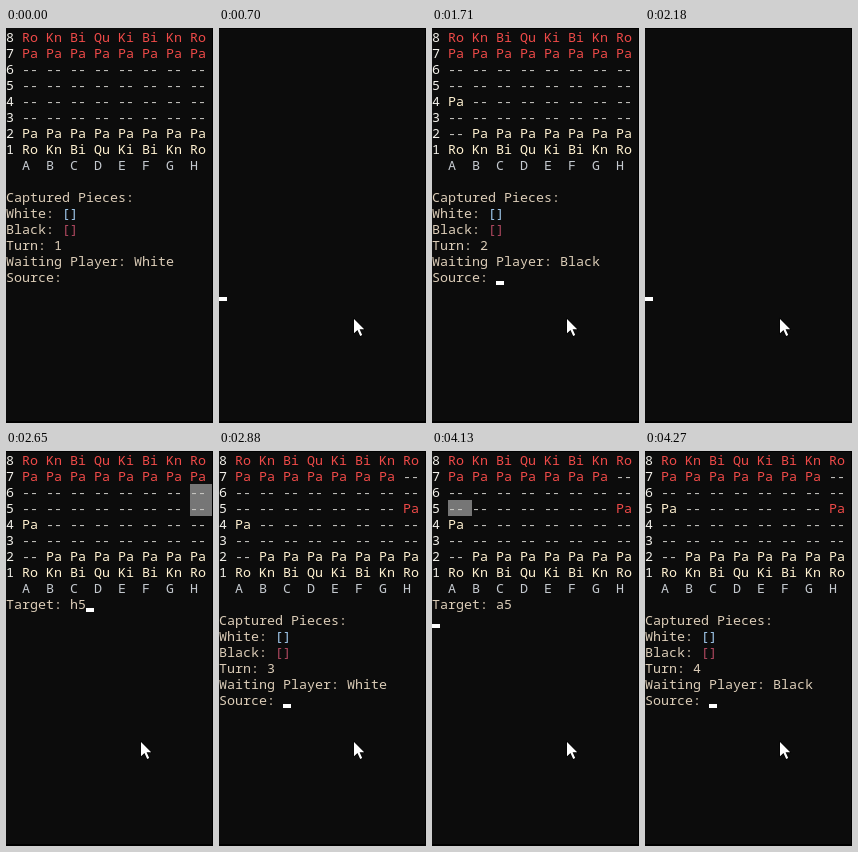
An HTML page that plays this animation: 207 by 395 pixels, repeating every 4350 ms.

```html
<!DOCTYPE html>
<html lang="en">
<head>
<meta charset="utf-8">
<title>Console chess</title>
<style>
html, body { margin: 0; width: 100%; height: 100%; overflow: hidden; background: #0c0c0c; }
svg { display: block; width: 207px; height: 395px; }
text { font: 13.333px "Noto Sans Mono", "DejaVu Sans Mono", monospace; white-space: pre; }
.edge { fill: #000; }
.caret { fill: #fff; }
.mark { fill: #767676; }
.red { fill: #ee4a48; }
.cream { fill: #fff1d0; }
.num { fill: #f2f0ea; }
.grey { fill: #cccac6; }
.file { fill: #c4c9cf; }
.label { fill: #dccdb8; }
.blue { fill: #a4cdf2; }
.wine { fill: #b54a62; }
</style>
</head>
<body>
<svg viewBox="0 0 207 395">
  <rect width="207" height="395" fill="#0c0c0c"/>
  <g id="screen"></g>
  <path class="edge" d="M206 0h1v395h-1zM0 393h207v2H0z"/>
  <g id="overlay">
    <path class="edge" d="M0 0h207v1H0z"/>
    <path d="M134.5 289.5v17l3.8-3.4 2.6 5.6 3-1.4-2.5-5.3h5z" fill="#000"/>
    <path d="M135 291v14.2l3.5-3.2 2.7 6 2-1-2.6-5.7h4.6z" fill="#fff"/>
  </g>
</svg>
<script>
const LOOP = 4350, CELL = 8, LINE = 16;
const screen = document.getElementById('screen');
const overlay = document.getElementById('overlay');

const rect = (col, row, cols, cls, top = 0) =>
  `<rect class="${cls}" x="${col * CELL}" y="${row * LINE + 1 + top}" width="${cols * CELL}" height="${LINE - top}"/>`;
const put = (col, row, str, cls) =>
  `<text class="${cls}" x="${col * CELL}" y="${row * LINE + 14}">${str}</text>`;
const caret = (col, row) => rect(col, row, 1, 'caret', 12);

// Squares are written like "a4"; the board lists rank 8 first.
const at = sq => [sq.charCodeAt(0) - 97, 8 - sq[1]];

function position(moves) {
  const back = 'Ro Kn Bi Qu Ki Bi Kn Ro'.split(' ');
  const side = (names, cls) => names.map(name => ({ name, cls }));
  const pawns = Array(8).fill('Pa'), none = Array(8).fill('--');
  const ranks = [side(back, 'red'), side(pawns, 'red')];
  for (let i = 0; i < 4; i++) ranks.push(side(none, 'grey'));
  ranks.push(side(pawns, 'cream'), side(back, 'cream'));
  for (const [from, to] of moves) {
    const [c, r] = at(from), [c2, r2] = at(to);
    ranks[r2][c2] = ranks[r][c];
    ranks[r][c] = { name: '--', cls: 'grey' };
  }
  return ranks;
}

const GAME = [['a2', 'a4'], ['h7', 'h5'], ['a4', 'a5']];

function board(turn, marks = []) {
  let out = '';
  for (const sq of marks) {
    const [c, r] = at(sq);
    out += rect(2 + 3 * c, r, 3, 'mark');
  }
  position(GAME.slice(0, turn - 1)).forEach((rank, r) => {
    out += put(0, r, 8 - r, 'num');
    rank.forEach((p, c) => out += put(2 + 3 * c, r, p.name, p.cls));
  });
  [...'ABCDEFGH'].forEach((f, c) => out += put(2 + 3 * c, 8, f, 'file'));
  return out;
}

// A null input hides the caret; "\n" puts it on the next line.
function prompt(row, label, input, typed = '') {
  let out = put(0, row, label, 'label');
  if (typed) out += put(8, row, typed, 'label');
  if (input === '\n') out += caret(0, row + 1);
  else if (input !== null) out += caret(8 + typed.length, row);
  return out;
}

const source = (turn, input, typed = input || '') => board(turn) +
  put(0, 10, 'Captured Pieces:', 'label') +
  put(0, 11, 'White:', 'label') + put(7, 11, '[]', 'blue') +
  put(0, 12, 'Black:', 'label') + put(7, 12, '[]', 'wine') +
  put(0, 13, 'Turn: ' + turn, 'label') +
  put(0, 14, 'Waiting Player:', 'label') +
  put(16, 14, turn % 2 ? 'White' : 'Black', 'label') +
  prompt(15, 'Source:', input, typed);

const target = (turn, marks, input, typed = input) =>
  board(turn, marks) + prompt(9, 'Target:', input, typed);

const blank = row => caret(0, row);

const first = ['a4', 'a3'], second = ['h6', 'h5'], third = ['a5'];
const steps = [
  [0, source(1, null)],
  [70, source(1, '')],
  [150, source(1, 'a')],
  [240, source(1, 'a2')],
  [700, blank(16)],
  [770, target(1, first, '')],
  [1320, target(1, first, 'a')],
  [1480, target(1, first, 'a4')],
  [1630, target(1, first, '\n', 'a4')],
  [1710, source(2, '')],
  [1950, source(2, 'h')],
  [2030, source(2, 'h7')],
  [2180, blank(16)],
  [2260, target(2, second, '')],
  [2650, target(2, second, 'h5')],
  [2800, blank(10)],
  [2880, source(3, '')],
  [3180, source(3, 'a')],
  [3260, source(3, 'a4')],
  [3330, source(3, '\n', 'a4')],
  [3410, blank(16)],
  [3490, target(3, third, '')],
  [3570, target(3, third, 'a')],
  [3720, target(3, third, 'a5')],
  [4130, target(3, third, '\n', 'a5')],
  [4200, blank(10)],
  [4270, source(4, '')]
];

let shown = -1;
const start = performance.now();

function draw(now) {
  const t = Math.max(0, now - start) % LOOP;
  let i = steps.length - 1;
  while (steps[i][0] > t) i--;
  if (i !== shown) {
    shown = i;
    screen.innerHTML = steps[i][1];
    overlay.style.display = i ? '' : 'none';
  }
  requestAnimationFrame(draw);
}
draw(start);
</script>
</body>
</html>
```
